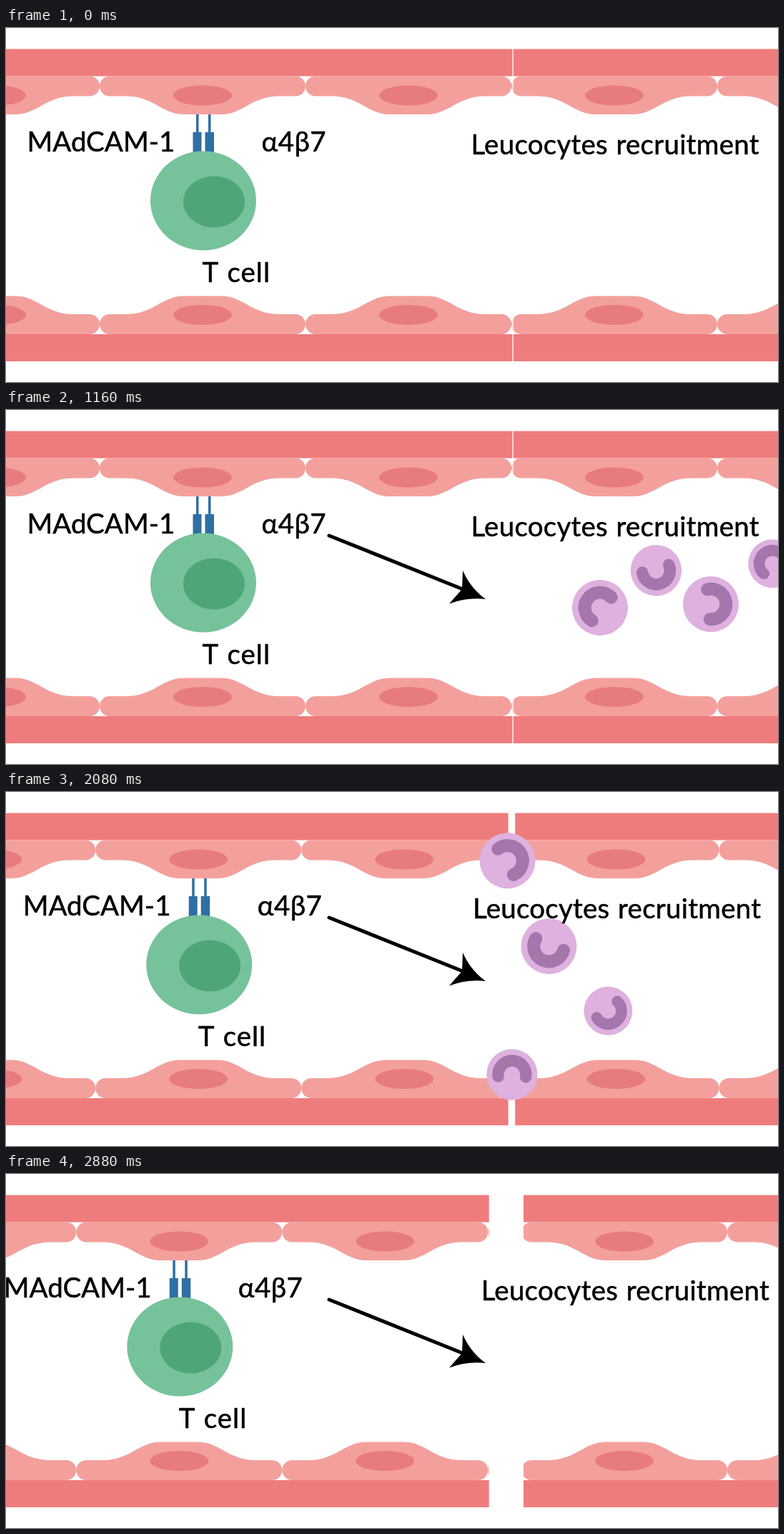
These frames come from a looping animation (1080x496 px, 3 s). An HTML page:

```html
<!DOCTYPE html>
<html lang="en">
<head>
<meta charset="utf-8">
<title>Leucocytes recruitment</title>
<style>
  html, body { margin: 0; width: 100%; height: 100%; overflow: hidden; background: #fff; }
  svg { display: block; width: 100%; height: 100%; }
  text {
    font: 400 38.5px Lato, "Open Sans", sans-serif;
    word-spacing: 1.5px;
    stroke: #000; stroke-width: .5; stroke-linejoin: round;
  }
</style>
</head>
<body>
<svg viewBox="0 0 1080 496">
  <defs>
    <clipPath id="leftClip"><rect x="-60" y="0" width="768.4" height="496"/></clipPath>
    <clipPath id="rightClip"><rect x="709.7" y="0" width="420" height="496"/></clipPath>
    <clipPath id="wipe"><rect id="wipeRect" x="449" y="160" width="0" height="120"/></clipPath>
    <g id="lining">
      <path fill="#f3a09d" d="M-130 67.5H130A14 14 0 0 1 130 95.5H108C68 95.5 57 121 26 121H-26C-57 121-68 95.5-108 95.5H-130A14 14 0 0 1-130 67.5Z"/>
      <ellipse cy="94.5" rx="41" ry="14" fill="#e87b80"/>
    </g>
    <g id="wall"><rect x="-60" y="29.5" width="1200" height="38" fill="#ef7c7c"/></g>
    <g id="vessel">
      <use href="#wall"/>
      <use href="#wall" transform="matrix(1 0 0 -1 0 496.5)"/>
    </g>
  </defs>

  <rect width="1080" height="496" fill="#fff"/>
  <g class="left">
    <use href="#vessel" clip-path="url(#leftClip)"/>
    <path fill="#2f6fa3" d="M266 121h3.5v25h4v30h-12v-30h4.5zM283 121h3.5v25h4.5v30h-12.5v-30h4.500z"/>
    <ellipse cx="276" cy="242" rx="74" ry="69.5" fill="#76c29a"/>
    <ellipse cx="291" cy="243.5" rx="43" ry="36" fill="#4ea577"/>
  </g>
  <g class="right"><use href="#vessel" clip-path="url(#rightClip)"/></g>

  <g id="cells"></g>

  <g clip-path="url(#wipe)">
    <path d="M452 176L640 251.5" stroke="#000" stroke-width="5" stroke-linecap="round"/>
    <path d="M639 225Q650 250 671 265Q645 262 620 271.5L638 251Z"/>
  </g>

  <g class="left">
    <text x="29.5" y="173">MAdCAM-1</text>
    <text x="357.5" y="173" letter-spacing=".4">α4β7</text>
    <text x="274.5" y="356" letter-spacing="1">T cell</text>
  </g>
  <g class="right">
    <text x="650.5" y="177" letter-spacing=".25">Leucocytes recruitment</text>
  </g>
</svg>
<script>
const LOOP = 3000, STEP = 40, LAST = 2880, ARROW = 780;
const GAP_X = 701, SOFT = 110, RAD = Math.PI / 180;
const NS = "http://www.w3.org/2000/svg";
const byId = id => document.getElementById(id);

// arrive: time at the gap; y: cruising height; sway: one swerve on the way;
// climb: exit speed; rest: final heading; settle: time the spin ends
const cells = [
  { r: 39, arrive: 1640, y: 250, sway: 55, climb: -.24, rest: 155, settle: 1995 },
  { r: 35.7, arrive: 1932, y: 268, sway: -85, climb: .2, rest: 90, settle: 1715 },
  { r: 39, arrive: 2300, y: 230, sway: 46, climb: -.4, rest: 305, settle: 2100 },
  { r: 34, arrive: 2645, y: 293, sway: -85, climb: .4, rest: 230, settle: 1765 }
];

// The first two cells travel as one pair, the last two as another
cells.forEach((c, i) => Object.assign(c, i < 2
  ? { speed: .27, swerve: 1000, exit: 1440 }
  : { speed: .25, swerve: 1100, exit: 2190 }));

const smooth = v => { const p = Math.max(0, Math.min(1, v)); return p * p * (3 - 2 * p); };
const bump = v => Math.exp(-v * v);
// Zero before 0, then rising like v, with a soft bend
const ramp = v => SOFT * Math.log(1 + Math.exp(v / SOFT));

function add(parent, tag, attrs) {
  const el = document.createElementNS(NS, tag);
  for (const k in attrs) el.setAttribute(k, attrs[k]);
  return parent.appendChild(el);
}

for (let i = 0; i < 5; i++) add(byId("wall"), "use", { href: "#lining", x: 288 * i - 13 });

const bend = 21.3, ex = bend * Math.cos(82 * RAD), ey = bend * Math.sin(82 * RAD);
for (const c of cells) {
  c.el = add(byId("cells"), "g", {});
  add(c.el, "circle", { r: 39, fill: "#deb1de" });
  add(c.el, "path", {
    d: `M${ex} ${ey}A${bend} ${bend} 0 1 1 ${ex} ${-ey}`,
    fill: "none", stroke: "#a476ac", "stroke-width": 18, "stroke-linecap": "round"
  });
}

const shift = (name, dx) => document.querySelectorAll(name)
  .forEach(el => el.setAttribute("transform", `translate(${dx} 0)`));

function place(c, t) {
  const x = GAP_X + c.speed * ramp(c.arrive - t);
  const y = c.y + c.sway * bump((t - c.swerve) / 200) + c.climb * ramp(t - c.exit);
  const spin = c.climb < 0 ? -.138 : .295;
  const a = c.rest + spin * ramp(c.settle - t);
  c.el.setAttribute("transform", `translate(${x} ${y}) rotate(${a}) scale(${c.r / 39})`);
}

function draw(t) {
  const open = smooth((t - 1930) / 560);
  shift(".left", -32.7 * open);
  shift(".right", 14.2 * open);
  byId("wipeRect").setAttribute("width", 223 * smooth(t % ARROW / 210));
  for (const c of cells) place(c, t);
}

function tick() {
  const t = performance.now() % LOOP;
  draw(Math.min(LAST, Math.floor(t / STEP) * STEP));
  requestAnimationFrame(tick);
}
tick();
</script>
</body>
</html>
```
